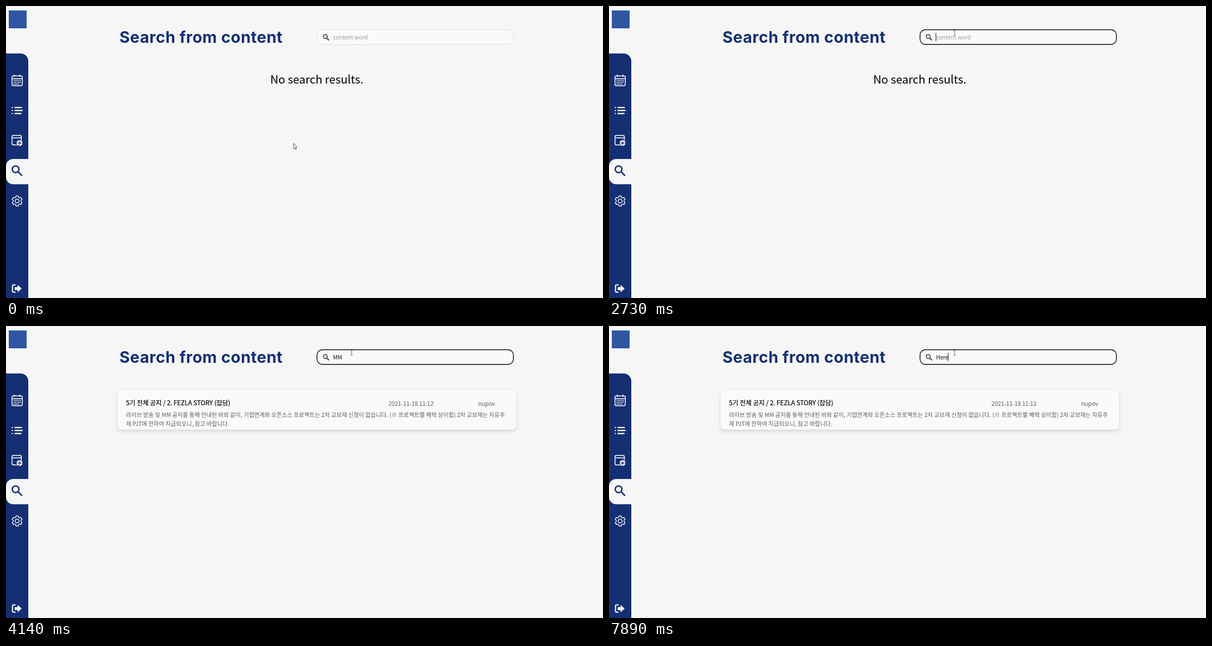
An HTML page for the animation above (8 s loop, 1071 by 523 pixels).

```html
<!DOCTYPE html>
<html lang="en">
<head>
<meta charset="utf-8">
<title>Search from content</title>
<style>
  html, body { margin: 0; width: 100%; height: 100%; overflow: hidden; background: #f6f6f6; }
  svg { display: block; width: 100%; height: 100%; }
  text { font-family: "Noto Sans CJK KR", "Noto Sans CJK JP", "Noto Sans CJK", sans-serif; white-space: pre; }
  .heading { font: 700 28.5px Inter, sans-serif; letter-spacing: .45px; fill: #152f75; }
  .message { font-size: 20.3px; text-anchor: middle; }
  .query { font-size: 10px; }
  .subject { font-size: 11.4px; font-weight: 500; stroke: #000; stroke-width: .2px; }
  .detail { font-size: 10.3px; fill: #5c5c5c; }
  .line { fill: none; stroke: #fff; stroke-width: 1.5; stroke-linecap: round; stroke-linejoin: round; }
  .thick { stroke-width: 2.3; }
  #card rect { filter: drop-shadow(0 3px 3px rgba(0, 0, 0, .13)); }
</style>
</head>
<body>
<svg viewBox="0 0 1071 523">
  <rect width="1071" height="523" fill="#f6f6f6"/>
  <rect x="5" y="8" width="32" height="32" fill="#2f569f"/>

  <path d="M0 85H26a14 14 0 0 1 14 14V523H0Z" fill="#142f73"/>
  <path d="M40 274H13a13 13 0 0 0 -13 13v19.3a13 13 0 0 0 13 13H40Z" fill="#f6f6f6"/>

  <!-- calendar -->
  <g class="line">
    <rect x="10.7" y="125.2" width="18.6" height="17.6" rx="2.2"/>
    <path d="M10.7 130.2H29.3M15 123.6v3M25 123.6v3"/>
    <path d="M13.6 133.4H27M13.6 136.6H27M13.6 139.8H24" stroke-width="1.7" stroke-linecap="butt" stroke-dasharray="1.7 1.1"/>
  </g>
  <!-- list -->
  <path class="line thick" d="M11.3 181.8h.1M16 181.8H27.5M11.3 187.2h.1M16 187.2H29M11.3 192.6h.1M16 192.6H27"/>
  <!-- new event -->
  <g class="line">
    <rect x="10.7" y="231.8" width="16.8" height="17" rx="2.6"/>
    <path d="M10.7 236.3H27.5"/>
    <circle cx="24.4" cy="245.4" r="5.6" fill="#fff" stroke="#142f73" stroke-width="1"/>
    <path d="M21.4 245.4h6M24.4 242.4v6" stroke="#142f73"/>
  </g>
  <!-- search -->
  <g fill="none" stroke="#142f73" stroke-width="2.5">
    <circle cx="17.2" cy="292.4" r="6"/>
    <path d="M21.6 296.8L28.8 304"/>
  </g>
  <!-- settings -->
  <g class="line" style="stroke-width:1.3">
    <path id="gear"/>
    <circle cx="20" cy="349.2" r="3.4"/>
  </g>
  <!-- log out -->
  <path class="line" style="stroke-width:2" d="M16.5 499.4H13.6a2 2 0 0 0 -2 2v9.2a2 2 0 0 0 2 2H16.5"/>
  <path d="M15.6 503.4h5.2v-3.9l7.2 6.6l-7.2 6.6v-3.9h-5.2Z" fill="#fff"/>

  <text class="heading" x="203.5" y="66">Search from content</text>

  <rect id="field" x="558" y="42.5" width="352.3" height="26.3" rx="9.5"/>
  <g fill="none" stroke="#111">
    <circle cx="572.8" cy="54.8" r="3.6" stroke-width="1.2"/>
    <path d="M575.5 57.5L579.4 61.4" stroke-width="1.6"/>
  </g>
  <circle id="click" cx="620" cy="48" r="6" fill="#f5ee3c"/>
  <text class="query" id="query" x="586.7" y="60"></text>
  <rect id="caret" y="48" width="1" height="15" fill="#222"/>

  <text class="message" id="empty" x="557.5" y="139">No search results.</text>

  <g id="searching">
    <g id="spinner" transform="translate(558 175.3)"></g>
    <text class="message" x="557.5" y="252">Searching...</text>
  </g>

  <g id="card">
    <rect x="200" y="114.5" width="715" height="71" rx="7" fill="#fafafa"/>
    <text class="subject" x="215.3" y="142.3">5기 전체 공지 / 2. FEZLA STORY (잡담)</text>
    <text class="detail" x="686" y="142.5">2021-11-18 11:12</text>
    <text class="detail" x="847" y="142.5">nupov</text>
    <text class="detail" x="215.3" y="163">라이브 방송 및 MM 공지를 통해 안내된 바와 같이, 기업연계와 오픈소스 프로젝트는 2차 교보재 신청이 없습니다. (※ 프로젝트별 혜택 상이함) 2차 교보재는 자유주</text>
    <text class="detail" x="215.3" y="178.6">제 PJT에 한하여 지급되오니, 참고 바랍니다.</text>
  </g>

  <path id="arrow" d="M0 0V9.6L2.1 7.7L3.6 11L5 10.4L3.6 7.2H6.2Z" fill="#fff" stroke="#333" stroke-width=".8"/>
  <path id="beam" d="M-2 -4.2H-.6L0 -3.7L.6 -4.2H2M0 -3.7V3.9M-2 4.4H-.6L0 3.9L.6 4.4H2" fill="none" stroke="#555" stroke-width=".9"/>
</svg>
<script>
const LOOP = 8000;
const FOCUS = 1690, CLICK_END = 1810, SEARCH = 3680, RESULTS = 4140;
const MOVE = { start: 860, step: 68, count: 11, glide: 9 };
const FIELD_TOP = 42;
const PLACEHOLDER = 'content word';

// time, typed text, caret x (0 = hidden)
const typing = [
  [0, '', 0], [1690, '', 586], [2210, '', 0], [2730, '', 586],
  [2930, 'M', 594], [3080, 'MM', 603], [3610, 'MM', 0],
  [4210, 'MM', 603], [4670, 'MM', 0], [5270, 'MM', 603], [5740, 'MM', 0],
  [5870, 'M', 0], [6010, '', 0], [6270, '', 586],
  [6700, 'H', 594], [6890, 'He', 599], [7490, 'He', 0],
  [7760, 'Her', 603], [7890, 'Here', 608]
];

const el = id => document.getElementById(id);
const show = (id, on) => el(id).setAttribute('visibility', on ? 'visible' : 'hidden');
const set = (id, attrs) => {
  for (const name in attrs) el(id).setAttribute(name, attrs[name]);
};

function buildGear() {
  const points = [];
  for (let tooth = 0; tooth < 6; tooth++) {
    for (const [offset, radius] of [[-18, 7.2], [-13, 9.4], [13, 9.4], [18, 7.2]]) {
      const angle = (tooth * 60 - 90 + offset) * Math.PI / 180;
      points.push([20 + radius * Math.cos(angle), 349.2 + radius * Math.sin(angle)].map(v => v.toFixed(2)));
    }
  }
  set('gear', { d: 'M' + points.join('L') + 'Z' });
}

function buildSpinner() {
  let petals = '';
  for (let i = 0; i < 12; i++) {
    const grey = 240 - i * 5.4;
    petals += `<ellipse cy="-22.6" rx="3.3" ry="6.6" transform="rotate(${i * 30})" fill="rgb(${grey},${grey},${grey})"/>`;
  }
  el('spinner').innerHTML = petals;
}

// Glide past the field's top edge, then settle inside it.
function pointerAt(t) {
  const step = Math.max(0, Math.min(MOVE.count, Math.floor((t - MOVE.start) / MOVE.step) + 1));
  if (step > MOVE.glide) return step === MOVE.count ? [620, 48] : [622, 45];
  const eased = (1 - Math.cos(Math.PI * step / MOVE.glide)) / 2;
  return [516 + 108 * eased, 246 - 206 * eased];
}

function draw(t) {
  const focused = t >= FOCUS;
  set('field', focused
    ? { fill: '#fafafa', stroke: '#111', 'stroke-width': 1.4 }
    : { fill: '#fafafa', stroke: '#dedede', 'stroke-width': 1 });
  show('click', focused && t < CLICK_END);

  const [, text, caret] = typing.findLast(row => row[0] <= t);
  el('query').textContent = text || PLACEHOLDER;
  set('query', { fill: text ? '#111' : '#9d9d9d' });
  show('caret', caret > 0);
  set('caret', { x: caret });

  show('empty', t < SEARCH);
  show('searching', t >= SEARCH && t < RESULTS);
  show('card', t >= RESULTS);

  const [x, y] = pointerAt(t);
  const overField = y > FIELD_TOP && y < FIELD_TOP + 27;
  show('arrow', !overField);
  show('beam', overField);
  set(overField ? 'beam' : 'arrow', { transform: `translate(${x} ${y})` });
}

buildGear();
buildSpinner();
const start = performance.now();
function tick() {
  draw((performance.now() - start) % LOOP);
  requestAnimationFrame(tick);
}
tick();
</script>
</body>
</html>
```
